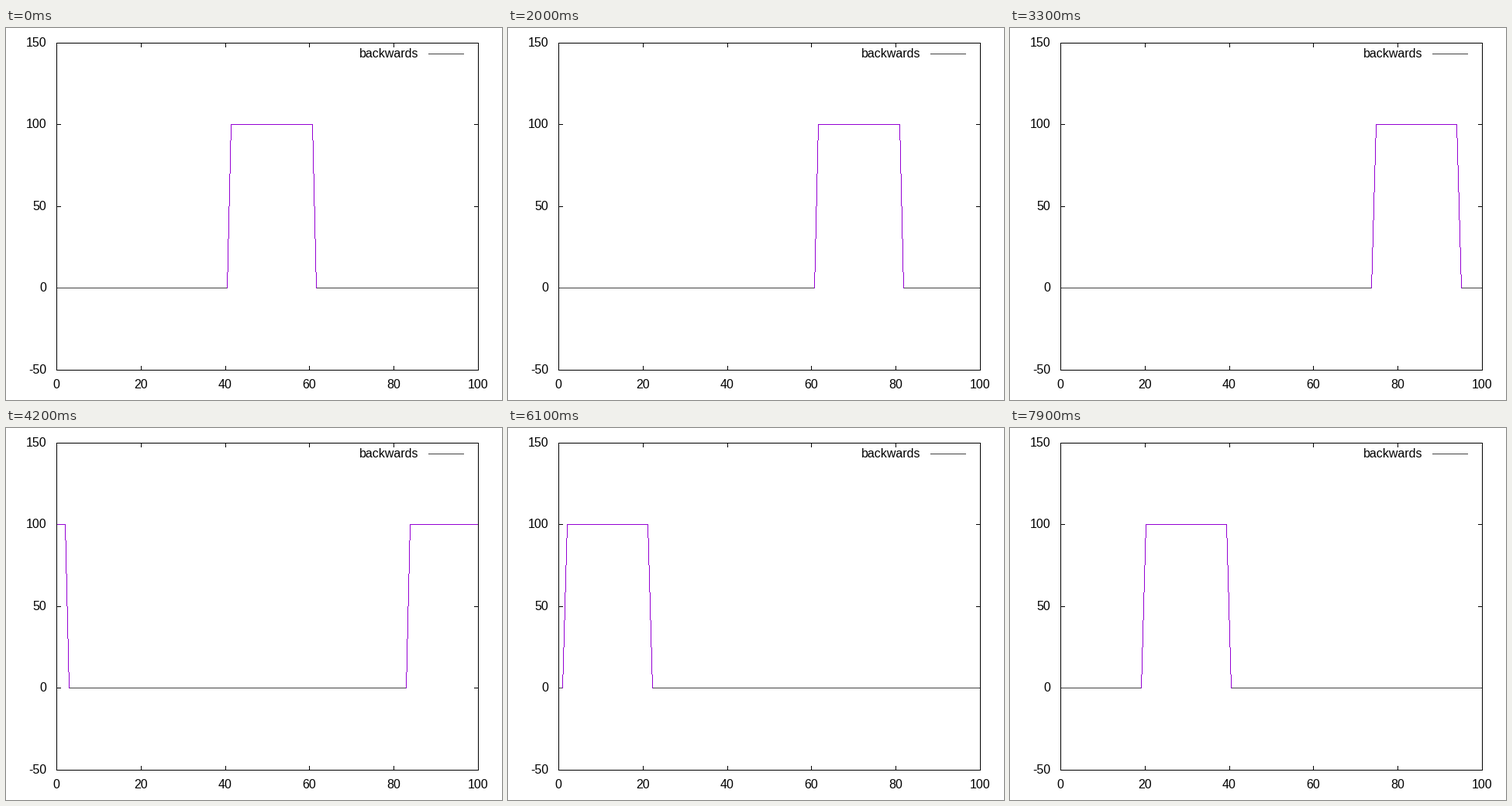
Animation, 640 px wide and 480 px high, one loop 8 s. Source, as a matplotlib script:

```python
import numpy as np
import matplotlib.pyplot as plt
from matplotlib.animation import FuncAnimation
from matplotlib.collections import LineCollection

W, H, DPI = 640, 480, 80
PX = 72 / DPI
FRAMES, STEP_MS = 80, 100
LEFT, RIGHT, TOP, BOTTOM = 65, 609, 19, 441
HIGH_Y, LOW_Y = 124, 335
PURPLE, GREY = "#9400d3", "#444444"
SAMPLES, PULSE, START = 100, 20, 41

plt.rcParams["font.family"] = "Liberation Sans"
fig = plt.figure(figsize=(W / DPI, H / DPI), dpi=DPI, facecolor="white")
ax = fig.add_axes([0, 0, 1, 1])
ax.set_xlim(0, W)
ax.set_ylim(H, 0)
ax.axis("off")


def hline(x0, x1, y):
    """Pixels x0..x1 of row y."""
    return [(x0, y + 0.5), (x1 + 1, y + 0.5)]


def vline(x, y0, y1):
    """Pixels y0..y1 of column x."""
    return [(x + 0.5, y0), (x + 0.5, y1 + 1)]


def add_lines(segments, color, z):
    lines = LineCollection(segments, colors=color, linewidths=PX,
                           antialiaseds=False, capstyle="butt", zorder=z)
    lines.set_snap(False)
    return ax.add_collection(lines, autolim=False)


def label(x, y, text, ha):
    ax.text(x, y, text, ha=ha, va="baseline", fontsize=16 * PX, color="black")


def draw_axes():
    ticks = []
    for value in range(0, 101, 20):
        x = int(LEFT + (RIGHT - LEFT) * value / 100 + 0.5)
        ticks += [vline(x, TOP, TOP + 5), vline(x, BOTTOM - 5, BOTTOM)]
        label(x, 465, str(value), "center")
    for value in range(-50, 151, 50):
        y = int(BOTTOM - (BOTTOM - TOP) * (value + 50) / 200)
        ticks += [hline(LEFT, LEFT + 5, y), hline(RIGHT - 5, RIGHT, y)]
        label(52, y + 5, str(value), "right")
    add_lines(ticks, "black", 1)
    add_lines([hline(LEFT, RIGHT, TOP), hline(LEFT, RIGHT, BOTTOM),
               vline(LEFT, TOP, BOTTOM), vline(RIGHT, TOP, BOTTOM)], "black", 3)
    label(532, 38, "backwards", "right")
    add_lines([hline(545, 590, 33)], GREY, 2)


def edge(x0, x1, falling):
    """Steep line between the two levels, as one-pixel vertical runs."""
    dx = x1 - x0
    part = np.clip((np.arange(dx + 2) - 0.5) / dx, 0, 1)
    cuts = HIGH_Y + np.round(part * (LOW_Y + 1 - HIGH_Y))
    return [vline(x0 + k if falling else x1 - k, cuts[k], cuts[k + 1] - 1)
            for k in range(dx + 1)]


index = np.arange(SAMPLES)
xs = np.floor(LEFT + (RIGHT - LEFT) * index / (SAMPLES - 1) + 0.5).astype(int)
draw_axes()
low_line = add_lines([], GREY, 2)
pulse_line = add_lines([], PURPLE, 2)


def update(n):
    high = (index - START - n) % SAMPLES < PULSE
    low_parts, pulse_parts = [], []
    first = 0
    for i in range(1, SAMPLES + 1):
        if i < SAMPLES and high[i] == high[first]:
            continue
        if high[first]:
            pulse_parts.append(hline(xs[first], xs[i - 1], HIGH_Y))
        else:
            low_parts.append(hline(xs[first], xs[i - 1], LOW_Y))
        if i < SAMPLES:
            pulse_parts += edge(xs[i - 1], xs[i], high[first])
        first = i
    low_line.set_segments(low_parts)
    pulse_line.set_segments(pulse_parts)
    return low_line, pulse_line


anim = FuncAnimation(fig, update, frames=FRAMES, interval=STEP_MS,
                     repeat=True, repeat_delay=0, blit=False)
plt.show()
```
